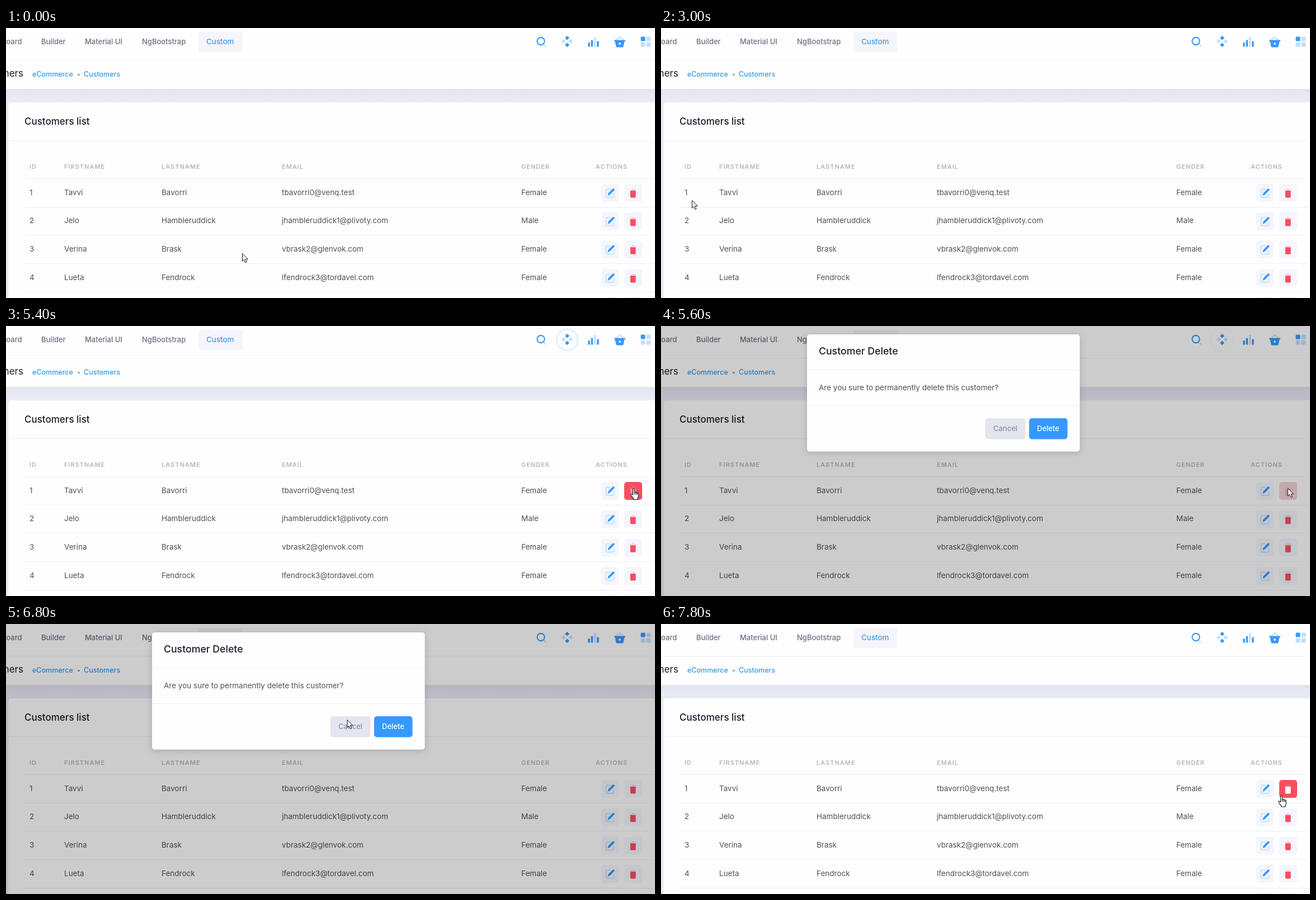
An HTML page that plays this animation: 1160x483 px, repeating every 8000 ms.

```html
<!DOCTYPE html>
<html lang="en">
<head>
<meta charset="utf-8">
<title>Customers list</title>
<style>
  html, body { margin: 0; width: 100%; height: 100%; overflow: hidden; background: #fefefe; }
  svg { display: block; width: 1160px; height: 483px; font-family: Inter, "Open Sans", sans-serif; }
  text { white-space: pre; }
  .nav { font-size: 13px; font-weight: 500; fill: #6c7084; }
  .crumb { font-size: 12.5px; font-weight: 500; fill: #3699e8; }
  .title { font-size: 17px; font-weight: 500; fill: #1c1d2c; }
  .head { font-size: 11px; font-weight: 600; fill: #b5b5c3; letter-spacing: 1px; }
  .cell { font-size: 13.5px; fill: #50505f; }
  .btn { font-size: 13px; font-weight: 500; }
</style>
</head>
<body>
<svg id="stage" viewBox="0 0 1160 483">
  <defs>
    <linearGradient id="band" x1="0" y1="0" x2="0" y2="1">
      <stop offset="0" stop-color="#e1e2ed"/>
      <stop offset=".35" stop-color="#e6e8f2"/>
      <stop offset="1" stop-color="#e9ebf5"/>
    </linearGradient>
    <filter id="shadow" x="-10%" y="-20%" width="120%" height="140%">
      <feDropShadow dx="0" dy="2" stdDeviation="6" flood-color="#000" flood-opacity=".18"/>
    </filter>
  </defs>
  <g id="page"></g>
  <g id="modal">
    <rect width="1160" height="483" opacity=".195"/>
    <rect x="261" y="15" width="487.5" height="209.5" rx="5" fill="#fefefe" filter="url(#shadow)"/>
    <path d="M261 78.5h487.5M261 142.5h487.5" stroke="#ebedf3"/>
    <text class="title" x="282" y="51" style="font-size:17.7px">Customer Delete</text>
    <text class="cell" x="282" y="115">Are you sure to permanently delete this customer?</text>
    <rect x="579.5" y="165" width="72" height="37.5" rx="5" fill="#e4e6ef"/>
    <text class="btn" x="615.5" y="187.5" text-anchor="middle" fill="#8a8ea3">Cancel</text>
    <rect x="658" y="165" width="68.5" height="37.5" rx="5" fill="#3699ff"/>
    <text class="btn" x="692" y="187.5" text-anchor="middle" fill="#fff">Delete</text>
  </g>
  <g id="arrow" fill="#fff" stroke="#16161c" stroke-linejoin="round">
    <path d="M.5.5V14.2L3.6 11.3 5.9 16.6 8.2 15.6 5.9 10.4H10.2Z"/>
  </g>
  <g id="hand" fill="#fff" stroke="#16161c" stroke-width="1.1" stroke-linejoin="round">
    <path d="M-.5 11.5V1.5Q-.5.3 .9.3T2.3 1.5V7Q4.7 5.7 5 7.5 7 6.5 7.3 8.3 9.3 7.5 9.3 9.5V14Q9.3 16 7.8 17.7V20H.5V18Q-2 15.5-4 11.7-4.8 9.7-3.2 9.7-2 9.7-.5 11.5Z"/>
    <path d="M2.3 7v4M5 7.5V11.3M7.3 8.3V11.5" fill="none"/>
  </g>
</svg>
<script>
const LOOP = 8000, STEP = 200;
const BLUE = '#3699ff', PALE = '#c2e0ff', RED = '#f64e60', SOFT = '#f4f6fc';
const $ = id => document.getElementById(id);

const text = (x, y, cls, str, extra = '') =>
  `<text x="${x}" y="${y}" class="${cls}" ${extra}>${str}</text>`;
const rect = (x, y, w, h, fill, rx = 0, extra = '') =>
  `<rect x="${x}" y="${y}" width="${w}" height="${h}" rx="${rx}" fill="${fill}" ${extra}/>`;
const line = (x, y, color = '#ebedf3') =>
  `<path d="M${x} ${y}H1160" stroke="${color}"/>`;

const columns = [42, 104, 278, 493, 921];
const heads = ['ID', 'FIRSTNAME', 'LASTNAME', 'EMAIL', 'GENDER'];
const customers = [
  ['1', 'Tavvi', 'Bavorri', 'tbavorri0@venq.test', 'Female'],
  ['2', 'Jelo', 'Hambleruddick', 'jhambleruddick1@plivoty.com', 'Male'],
  ['3', 'Verina', 'Brask', 'vbrask2@glenvok.com', 'Female'],
  ['4', 'Lueta', 'Fendrock', 'lfendrock3@tordavel.com', 'Female'],
  []
];

function toolbar() {
  const diamond = (x, y, fill) =>
    rect(x - 2.8, y - 2.8, 5.6, 5.6, fill, 1, `transform="rotate(45 ${x} ${y})"`);
  const bar = (x, y, fill) => rect(x, y, 3.4, 33.5 - y, fill, 1.2);
  return `<path d="M961 28.5l3.8 4" stroke="${PALE}" stroke-width="2.2" stroke-linecap="round"/>
    <circle cx="956" cy="23.5" r="6.6" fill="none" stroke="${BLUE}" stroke-width="2.1"/>`
    + diamond(1003, 17.7, BLUE) + diamond(996.7, 24, PALE)
    + diamond(1009.3, 24, PALE) + diamond(1003, 30.3, BLUE)
    + bar(1040.3, 26, BLUE) + bar(1045.6, 21.5, BLUE)
    + bar(1050.9, 16, PALE) + bar(1056.2, 23.5, BLUE)
    + `<path d="M1090 22l7-6 7 6" fill="none" stroke="${PALE}" stroke-width="2.2"/>
    <path d="M1087 21.5h20q.7 2-1.5 2.5l-2 9q-.3 1.5-2 1.5h-9q-1.7 0-2-1.5l-2-9q-2.2-.5-1.5-2.5z" fill="${BLUE}"/>
    <circle cx="1097" cy="28" r="1.9" fill="#fff"/>`
    + rect(1134.5, 15.5, 8, 8, BLUE, 1.6) + rect(1144.5, 15.5, 8, 8, PALE, 1.6)
    + rect(1134.5, 25.5, 8, 8, PALE, 1.6) + rect(1144.5, 25.5, 8, 8, PALE, 1.6);
}

function actions(i) {
  const y = 279 + i * 50.65;
  return `<g transform="translate(0 ${y})">`
    + rect(1064, 0, 31.5, 32, SOFT, 5, `id="editBox${i}"`)
    + `<path id="editPage${i}" d="M1081 9.5h-6.5q-2 0-2 2v10.5q0 2 2 2h10q2 0 2-2V17" fill="none" stroke="${PALE}" stroke-width="1.8"/>
    <path id="editPen${i}" d="M1075.5 21l1-4.5 8-8q1.2-.9 2.5.3t.3 2.5l-8 8z" fill="${BLUE}"/>`
    + rect(1105, 0, 32, 32, SOFT, 5, `id="binBox${i}"`)
    + `<path id="binLid${i}" d="M1115 11v-1h3.8v-1.200h4v1.200h3.800v1z" fill="${RED}" opacity=".3"/>
    <path id="bin${i}" d="M1115.8 12h9.8v10.8q0 1.7-1.7 1.7h-6.4q-1.7 0-1.7-1.7z" fill="${RED}"/></g>`;
}

function buildPage() {
  const rows = customers.map((row, i) => {
    const y = 298.7 + i * 50.65;
    return row.map((s, c) => text(columns[c], y, 'cell', s)).join('')
      + line(33, Math.round(269 + i * 50.65) + .5) + actions(i);
  });
  $('page').innerHTML = rect(0, 0, 1160, 483, '#e9ebf5')
    + rect(0, 109, 1160, 26, 'url(#band)')
    + rect(0, 0, 1160, 109, '#fefefe') + line(0, 57.5, '#efeff3')
    + rect(4.5, 133, 1170, 370, '#fefefe', 5)
    + text(28.5, 28.5, 'nav', 'Dashboard', 'text-anchor="end"')
    + text(63, 28.5, 'nav', 'Builder') + text(141, 28.5, 'nav', 'Material UI')
    + text(243, 28.5, 'nav', 'NgBootstrap')
    + rect(344, 7, 78.5, 36, '#f5f6fc', 4)
    + text(358, 28.5, 'nav', 'Custom', 'style="fill:#4898e0;font-size:13.4px"')
    + `<circle id="ring" cx="1003" cy="24.5" fill="none" stroke="${BLUE}" stroke-width="2.6"/>`
    + toolbar()
    + text(31, 87, 'title', 'Customers', 'text-anchor="end" style="font-weight:400"')
    + text(47, 87.2, 'crumb', 'eCommerce')
    + '<circle cx="130" cy="83.5" r="1.8" fill="#8a9bb8"/>'
    + text(139, 87.2, 'crumb', 'Customers')
    + text(33, 173.3, 'title', 'Customers list') + line(5, 201.5)
    + heads.map((s, c) => text(columns[c], 252, 'head', s)).join('')
    + text(1054, 252, 'head', 'ACTIONS') + rows.join('');
}

// Tracks are [time, value...] rows with linear interpolation.
const pointer = [
  [0, 422, 403], [400, 418, 400], [1400, 270, 372], [2400, 62, 316],
  [3000, 55, 308], [3200, 70, 304], [3600, 220, 296], [4200, 560, 294],
  [4800, 1085, 296], [5200, 1117, 291], [5400, 1121, 290.5], [5600, 1120, 290], [6000, 1120, 290],
  [6600, 640, 180], [6800, 609.5, 171], [7200, 609.5, 171], [7600, 1010, 280], [7800, 1108, 307]
];
const editHover = [[0, 0], [4600, 0], [4800, .8], [5200, 0]];
const binHover = [[0, 0], [5000, 0], [5200, .8], [5400, 1], [5600, .22], [5800, 0], [6800, 0], [7000, .75], [7200, 1]];
const binIcon = [[0, 0], [5000, 0], [5400, .4], [5600, .5], [5800, 0], [6800, 0], [7000, .2], [7200, 1]];

function at(track, t) {
  const i = track.findIndex(k => k[0] > t);
  if (i < 0) return track[track.length - 1].slice(1);
  const a = track[i - 1], b = track[i], p = (t - a[0]) / (b[0] - a[0]);
  return a.slice(1).map((v, j) => v + (b[j + 1] - v) * p);
}

function mix(from, to, p) {
  const part = (c, i) => parseInt(c.slice(i, i + 2), 16);
  return `rgb(${[1, 3, 5].map(i => Math.round(part(from, i) * (1 - p) + part(to, i) * p))})`;
}

const show = (id, on) => $(id).style.display = on ? '' : 'none';
const paint = (id, color, attr = 'fill') => $(id).setAttribute(attr, color);

function drawRing(t) {
  const p = ((t - 800 + 3500) % 3500) / 1400;
  const fade = (p - .125) / .875;
  const on = p > 0 && p < 1;
  show('ring', on);
  if (!on) return;
  $('ring').setAttribute('r', 1.6 + 19.3 * (1 - (1 - p) ** 1.5));
  $('ring').setAttribute('opacity', fade < 0 ? p / .125 : (1 - fade) ** 1.3);
}

function draw(t) {
  const open = t >= 5600 && t < 7000;
  const [x, y] = at(pointer, t);
  const overButton = !open && y > 279 && y < 311 && ((x > 1064 && x < 1095) || (x > 1105 && x < 1137));
  show('modal', open);
  show('hand', overButton);
  show('arrow', !overButton);
  $(overButton ? 'hand' : 'arrow').setAttribute('transform', `translate(${x} ${y})`);

  const [edit] = at(editHover, t), [bin] = at(binHover, t), [icon] = at(binIcon, t);
  paint('editBox0', mix(SOFT, BLUE, edit));
  paint('editPage0', mix(PALE, '#ffffff', edit), 'stroke');
  paint('editPen0', mix(BLUE, '#ffffff', edit));
  paint('binBox0', mix(SOFT, RED, bin));
  paint('bin0', mix(RED, '#ffffff', icon));
  paint('binLid0', mix(RED, '#ffffff', icon));
  drawRing(t);
}

buildPage();
const start = performance.now();
function tick() {
  const t = (performance.now() - start) % LOOP;
  draw(Math.floor(t / STEP) * STEP);
  requestAnimationFrame(tick);
}
tick();
</script>
</body>
</html>
```
